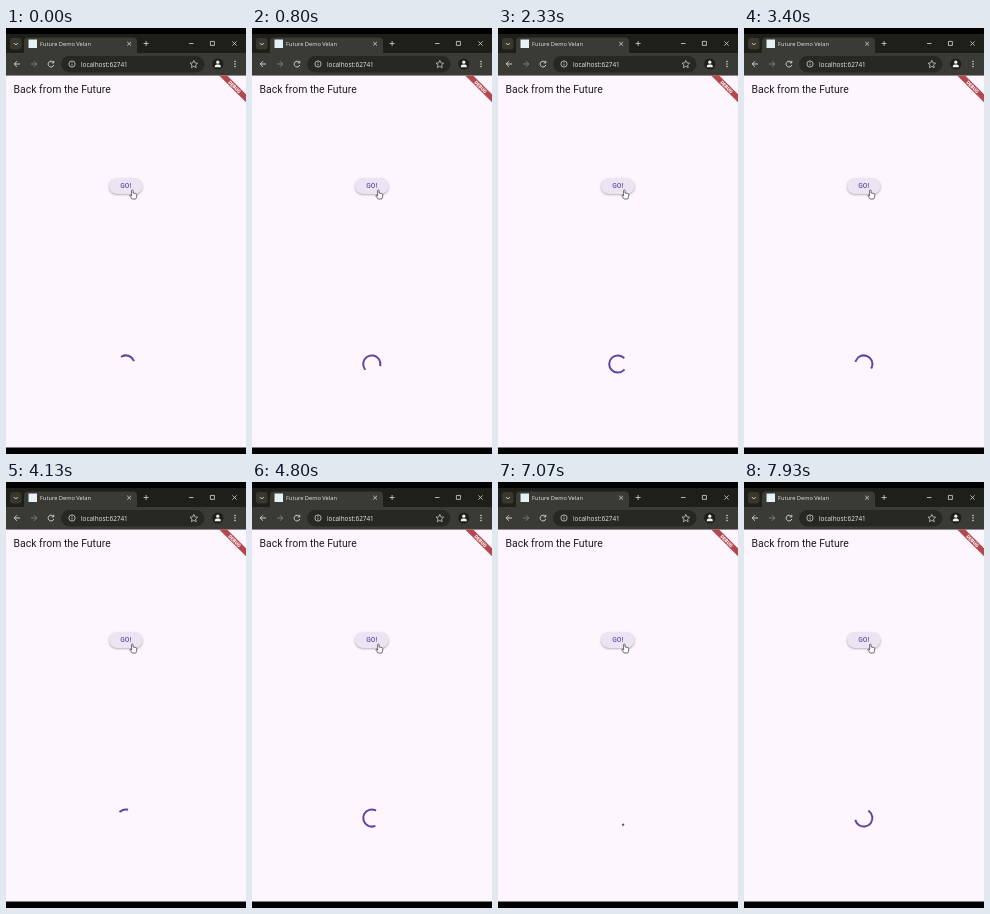
These frames come from a looping animation (240 px wide and 426 px high, 8000 ms). An HTML page with a canvas:

```html
<!DOCTYPE html>
<html lang="en">
<head>
<meta charset="utf-8">
<title>Loading demo</title>
<style>
html, body { margin: 0; width: 100%; height: 100%; overflow: hidden; background: #000; }
canvas { display: block; width: 240px; height: 426px; }
</style>
</head>
<body>
<canvas id="stage"></canvas>
<script>
const W = 240, H = 426, LOOP = 8000, STEP = 1000 / 15;
const UI = '"Open Sans", "Noto Sans", sans-serif';
const ROBOTO = 'Roboto, sans-serif';
const canvas = document.getElementById('stage');
const ctx = canvas.getContext('2d');
const dpr = window.devicePixelRatio || 1;
canvas.width = W * dpr;
canvas.height = H * dpr;

function box(x, y, w, h, fill, r = 0) {
  ctx.fillStyle = fill;
  ctx.beginPath();
  ctx.roundRect(x, y, w, h, r);
  ctx.fill();
}

function disc(x, y, r, fill) {
  ctx.fillStyle = fill;
  ctx.beginPath();
  ctx.arc(x, y, r, 0, Math.PI * 2);
  ctx.fill();
}

function stroke(d, color, width = 0.9) {
  ctx.strokeStyle = color;
  ctx.lineWidth = width;
  ctx.stroke(new Path2D(d));
}

function label(str, x, y, font, color, align = 'left') {
  ctx.font = font;
  ctx.fillStyle = color;
  ctx.textAlign = align;
  ctx.fillText(str, x, y);
}

function drawTabs() {
  box(0, 6, W, 20, '#1f1f19');
  box(4, 10, 11.5, 11.5, '#38382f', 3);
  stroke('M7.8 15 L9.8 17 L11.8 15', '#dedede');
  box(18, 9.5, 113, 17, '#3b3b35', [4, 4, 0, 0]);
  box(22.5, 11.5, 8.5, 8.5, '#e6f1f5');
  label('Future Demo Velan', 34, 17.8, '5.7px ' + UI, '#e4e4e4');
  stroke('M121.2 13.8 l3.8 3.8 m0 -3.8 l-3.8 3.8', '#d8d8d8', 0.8);
  stroke('M137.6 15.5 h5 m-2.5 -2.5 v5', '#d8d8d8', 0.8);
  stroke('M183 15.5 h4.5', '#d8d8d8', 0.8);
  stroke('M204.4 13.4 h4 v4 h-4 z', '#d8d8d8', 0.8);
  stroke('M226.4 13.4 l4.2 4.2 m0 -4.2 l-4.2 4.2', '#d8d8d8', 0.8);
}

function drawToolbar() {
  box(0, 25, W, 22.5, '#3b3b35');
  stroke('M14 36 H8.2 m2.8 -2.8 l-2.8 2.8 l2.8 2.8', '#dadada');
  stroke('M25 36 h5.8 m-2.8 -2.8 l2.8 2.8 l-2.8 2.8', '#83837e');
  stroke('M47.4 34.4 A2.9 2.9 0 1 0 47.8 37 M47.8 32.8 v2.1 h-2.1', '#dadada');
  box(55, 28, 143.5, 16.5, '#282822', 8.2);
  stroke('M62.9 36 a3.1 3.1 0 1 0 6.2 0 a3.1 3.1 0 1 0 -6.2 0 M66 35.6 v2 M66 34 v.8', '#d4d4d4', 0.8);
  label('localhost:62741', 75, 38.6, '6.4px ' + UI, '#e8e8e8');
  stroke('M187.8 32.4 l1.1 2.5 l2.7 .3 l-2 1.8 l.6 2.7 l-2.4 -1.4 l-2.4 1.4 l.6 -2.7 l-2 -1.8 l2.7 -.3 z', '#dadada', 0.7);
  disc(211.8, 36, 5.6, '#1e1e1a');
  disc(211.8, 34.2, 1.6, '#f2f2f2');
  box(208.8, 36.5, 6, 2.8, '#f2f2f2', [2, 2, 0, 0]);
  for (const y of [33.6, 36, 38.4]) disc(229, y, 0.75, '#e4e4e4');
}

function drawBanner() {
  ctx.save();
  ctx.beginPath();
  ctx.rect(0, 47.5, W, 372);
  ctx.clip();
  ctx.translate(W, 47.5);
  ctx.rotate(Math.PI / 4);
  box(-19, 13.3, 38, 5.7, '#b4484f');
  label('DEBUG', 0, 17.9, '900 4.8px ' + ROBOTO, '#fff', 'center');
  ctx.restore();
}

function drawButton() {
  ctx.save();
  ctx.shadowColor = 'rgba(0,0,0,.32)';
  ctx.shadowBlur = 2.2 * dpr;
  ctx.shadowOffsetY = 0.9 * dpr;
  box(103, 150.3, 33.6, 15.6, '#ebe5f3', 7.8);
  ctx.restore();
  label('GO!', 119.8, 160.4, '500 6.7px ' + ROBOTO, '#6750a4', 'center');
}

function drawHand() {
  const hand = new Path2D('M125.6 162.4 q.8 -.9 1.5 0 v2.6 l2.8 .6 q1 .3 1 1.2 l-.5 2.8 l-.6 1.4 h-3.7 l-2.2 -3 q-.2 -1 .6 -.9 l1.1 .9 z');
  ctx.fillStyle = '#fff';
  ctx.fill(hand);
  ctx.strokeStyle = '#33313a';
  ctx.lineWidth = 0.7;
  ctx.stroke(hand);
}

// Cubic bezier (0.4, 0, 0.2, 1), solved for x by bisection.
function fastOutSlowIn(x) {
  if (x <= 0) return 0;
  if (x >= 1) return 1;
  let lo = 0, hi = 1, s;
  for (let i = 0; i < 24; i++) {
    s = (lo + hi) / 2;
    const at = 1.2 * (1 - s) ** 2 * s + 0.6 * (1 - s) * s * s + s ** 3;
    if (at < x) lo = s; else hi = s;
  }
  return 3 * s * s - 2 * s ** 3;
}

function drawSpinner(t) {
  const time = t + 60 * Math.exp(-t / 300);
  const phase = (0.668 + time / 1333) % 1;
  const turn = (0.222 + time / 2222) % 1;
  const head = fastOutSlowIn(phase * 2);
  const tail = fastOutSlowIn(phase * 2 - 1);
  const start = Math.PI * (-0.5 + 1.5 * tail + 2 * turn + 0.5 * phase);
  const sweep = Math.max(1.5 * Math.PI * (head - tail), 0.001);
  ctx.strokeStyle = '#5d46a0';
  ctx.lineWidth = 2;
  ctx.lineCap = 'square';
  ctx.beginPath();
  ctx.arc(119.8, 336, 8.6, start, start + sweep);
  ctx.stroke();
  ctx.lineCap = 'butt';
}

function draw(t) {
  ctx.setTransform(dpr, 0, 0, dpr, 0, 0);
  box(0, 0, W, H, '#000');
  drawTabs();
  drawToolbar();
  box(0, 47.5, W, 372, '#fef6ff');
  label('Back from the Future', 7.6, 64.8, '10.45px ' + ROBOTO, '#1d1b20');
  drawBanner();
  drawButton();
  drawHand();
  drawSpinner(t);
}

function tick() {
  const t = performance.now() % LOOP;
  draw(Math.floor((t + 4) / STEP) * STEP);
  requestAnimationFrame(tick);
}
tick();
</script>
</body>
</html>
```
